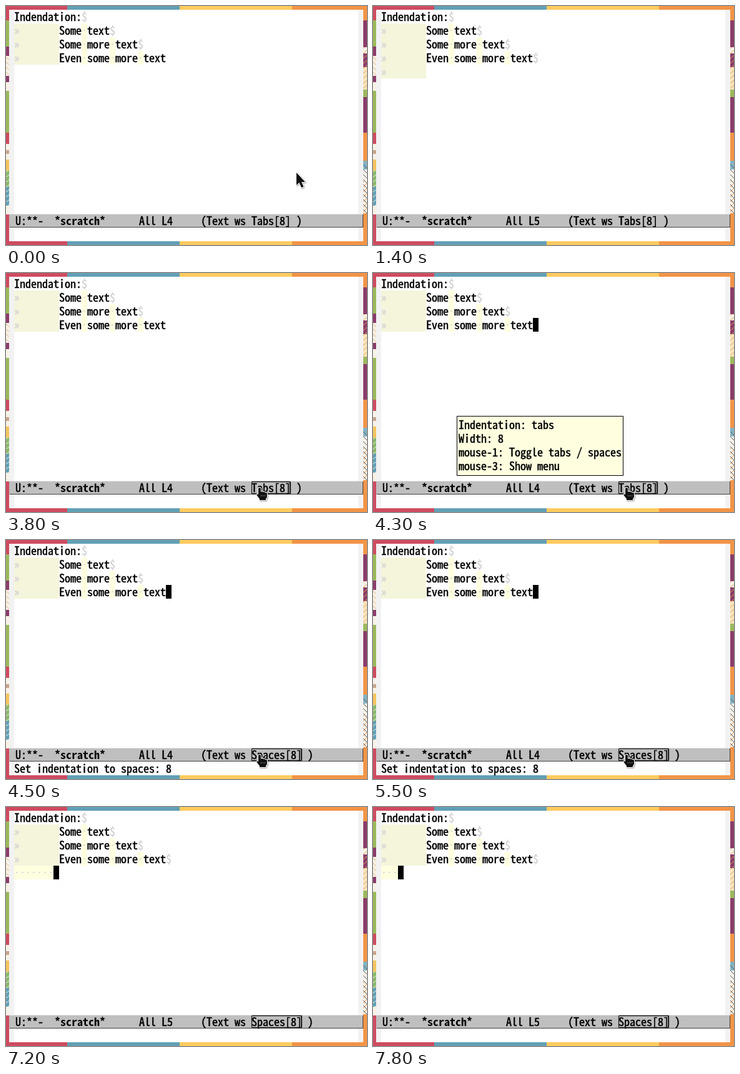
Animation, 578 px wide and 383 px high, one loop 8 s. Source, as an HTML page with a canvas:

```html
<!DOCTYPE html>
<html lang="en">
<head>
<meta charset="utf-8">
<title>Indentation in a text editor</title>
<style>
  html, body { margin: 0; width: 100%; height: 100%; overflow: hidden; }
  canvas { display: block; }
</style>
</head>
<body>
<canvas id="stage" width="578" height="383"></canvas>
<script>
const ctx = document.getElementById('stage').getContext('2d');
const LOOP = 8000, CELL = 9, ROW = 22, LEFT = 13, TOP = 6, BASELINE = 18;
const FONT = '18px "Noto Sans Mono CJK JP", "Noto Sans Mono CJK SC", "Noto Sans Mono", monospace';
const FAINT = '#d3d3d3';
const LINES = ['Indendation:', '\tSome text', '\tSome more text', '\tEven some more text'];

// The block cursor flips at each of these times, starting hidden.
const BLINKS = [100, 600, 900, 1400, 1900, 2800, 3300, 3800, 4300, 5000, 5500, 6000, 6100, 6600, 7100];
const DELETES = [7200, 7400, 7500, 7700, 7800];
const passed = (times, t) => times.filter(time => time <= t).length;

function rect(color, x, y, w, h) {
  ctx.fillStyle = color;
  ctx.fillRect(x, y, w, h);
}

// Every glyph sits on the character grid; a hairline gives regular text a medium weight.
function write(text, x, baseline, color = '#000', bold = false) {
  ctx.font = (bold ? 'bold ' : '') + FONT;
  ctx.fillStyle = ctx.strokeStyle = color;
  ctx.lineWidth = 0.5;
  [...text].forEach((char, i) => {
    ctx.fillText(char, x + i * CELL, baseline);
    if (!bold) ctx.strokeText(char, x + i * CELL, baseline);
  });
}

function strip(x, width, bands) {
  bands.forEach(([y, color], i) => {
    const end = i + 1 < bands.length ? bands[i + 1][0] : 383;
    rect(color, x, y, width, end - y);
  });
}

function hatch(x, y, height, color, slope) {
  ctx.save();
  ctx.beginPath();
  ctx.rect(x, y, 6, height);
  ctx.clip();
  ctx.beginPath();
  for (let dy = -6; dy < height + 6; dy += 8) {
    ctx.moveTo(x, y + dy);
    ctx.lineTo(x + 6, y + dy + slope);
  }
  ctx.strokeStyle = color;
  ctx.lineWidth = 1;
  ctx.stroke();
  ctx.restore();
}

function drawBackdrop() {
  strip(0, 5, [[0, '#cf4b60'], [23, '#9bb95b'], [65, '#8b3c6b'], [80, '#f7f1e6'],
    [112, '#8b3c6b'], [122, '#f7f1e6'], [136, '#9bb95b'], [203, '#cf4b60'],
    [221, '#f7f1e6'], [231, '#c9a58c'], [237, '#f7f1e6'], [246, '#f3c45f'],
    [264, '#8ab86b'], [290, '#62a0b6'], [320, '#f7f1e6'], [334, '#cf4b60']]);
  strip(572, 6, [[0, '#f39446'], [23, '#8b3c6b'], [66, '#f7f1e6'], [76, '#8b3c6b'],
    [98, '#f7e5bd'], [134, '#9bb95b'], [146, '#8b3c6b'], [203, '#f39446'],
    [248, '#83b2c2'], [262, '#f7f1e6'], [332, '#f39446']]);
  hatch(0, 80, 32, '#e6b27a', 5);
  hatch(0, 264, 56, '#e8efe8', -4);
  hatch(572, 66, 68, '#e5a04e', -5);
  hatch(572, 252, 80, '#4a5a6c', 6);
  hatch(572, 280, 52, '#f39446', -6);
  for (const y of [0, 377]) {
    rect('#cf4b60', 0, y, 98, 6);
    rect('#62a0b6', 98, y, 180, 6);
    rect('#ffcb5f', 278, y, 180, 6);
    rect('#f39446', 458, y, 120, 6);
  }
  rect('#fff', 5, 6, 567, 371);
  rect('#f2f2f2', 5, 6, 8, 371);
  rect('#f2f2f2', 564, 6, 8, 371);
}

function drawLine(text, row, hasNewline) {
  const y = TOP + row * ROW;
  let x = LEFT;
  for (const char of text) {
    const width = char === '\t' ? 8 * CELL : CELL;
    if (char === '\t') {
      rect('#f5f5dc', x, y, width, ROW);
      write('»', x, y + BASELINE, FAINT);
    } else if (char === ' ') {
      rect('#ffffe0', x, y, width, ROW);
      rect(FAINT, x + 3.5, y + 10, 2, 2);
    } else {
      write(char, x, y + BASELINE);
    }
    x += width;
  }
  if (hasNewline) write('$', x, y + BASELINE, FAINT);
  return x;
}

function drawModeLine(lineNumber, style, hovered) {
  rect('#bfbfbf', 5, 334, 567, 21);
  rect('#e5e5e5', 5, 333, 567, 1);
  rect('#404040', 6, 354, 566, 1);
  rect('#404040', 571, 334, 1, 21);
  const at = column => 15 + column * CELL;
  write('U:**-', at(0), 351);
  write('*scratch*', at(7), 351, '#000', true);
  write('All L' + lineNumber, at(22), 351);
  write(`(Text ws ${style} )`, at(33), 351);
  if (hovered) {
    const width = style.length * CELL;
    ctx.strokeStyle = '#202020';
    ctx.lineWidth = 1.3;
    ctx.beginPath();
    ctx.roundRect(393.5, 334.5, width - 1, 19, 1);
    ctx.stroke();
    rect('#202020', 391 + width, 335, 2, 18);
  }
}

function drawTooltip() {
  rect('#000', 134, 229, 267, 96);
  rect('#ffffe0', 135, 230, 265, 94);
  ['Indentation: tabs', 'Width: 8', 'mouse-1: Toggle tabs / spaces', 'mouse-3: Show menu']
    .forEach((text, i) => write(text, 137, 250 + i * ROW));
}

function drawPointer(x, y, isHand) {
  const arrow = 'M0 0V20L4.5 16L8 24L11.5 22.5L8 15H14Z';
  const hand = 'M-2 1Q0 -1 2 1V7Q4 5 5.5 7Q8 6 9 8Q12 7 12 10V15L10 18V20H0V18L-4.5 12' +
    'Q-5 9 -2 11Z';
  const path = new Path2D(isHand ? hand : arrow);
  ctx.save();
  ctx.translate(x, y);
  ctx.lineJoin = 'round';
  ctx.shadowColor = '#0006';
  ctx.shadowBlur = 2;
  ctx.shadowOffsetX = ctx.shadowOffsetY = 1;
  ctx.strokeStyle = '#fff';
  ctx.lineWidth = 2;
  ctx.stroke(path);
  ctx.shadowColor = 'transparent';
  ctx.fillStyle = '#111';
  ctx.fill(path);
  if (isHand) {
    for (const dx of [2, 5, 8]) rect('#888', dx, 12, 1, 2);
  }
  ctx.restore();
}

function pointerAt(t) {
  if (t < 900) return { x: 465, y: 267 };
  if (t < 3000 || t >= 6100) return null;
  const step = Math.min(6, Math.floor((t - 3000) / 100)) / 6;
  const eased = 1 - (1 - step) ** 2;
  return { x: 455 - 49 * eased, y: 273 + 71 * eased };
}

function fifthLine(t) {
  if (t >= 6100) return ' '.repeat(8 - passed(DELETES, t));
  if (t >= 900 && t < 1900) return '\t';
  return t >= 1900 && t < 2200 ? '' : null;
}

function draw(t) {
  const extra = fifthLine(t);
  const lines = extra === null ? LINES : [...LINES, extra];
  const pointer = pointerAt(t);
  const overStyle = !!pointer && pointer.y >= 334;

  drawBackdrop();
  let cursorX = LEFT;
  lines.forEach((line, row) => {
    cursorX = drawLine(line, row, row < lines.length - 1);
  });
  if (passed(BLINKS, t) % 2) rect('#000', cursorX, TOP + (lines.length - 1) * ROW, CELL, ROW);

  drawModeLine(lines.length, t < 4500 ? 'Tabs[8]' : 'Spaces[8]', overStyle || t >= 4500);
  if (t >= 4500 && t < 6100) write('Set indentation to spaces: 8', LEFT, 373);
  if (t >= 4000 && t < 4500) drawTooltip();
  if (pointer) drawPointer(pointer.x, pointer.y, overStyle);
}

const start = performance.now();
function tick() {
  draw((performance.now() - start) % LOOP);
  requestAnimationFrame(tick);
}
tick();
</script>
</body>
</html>
```
